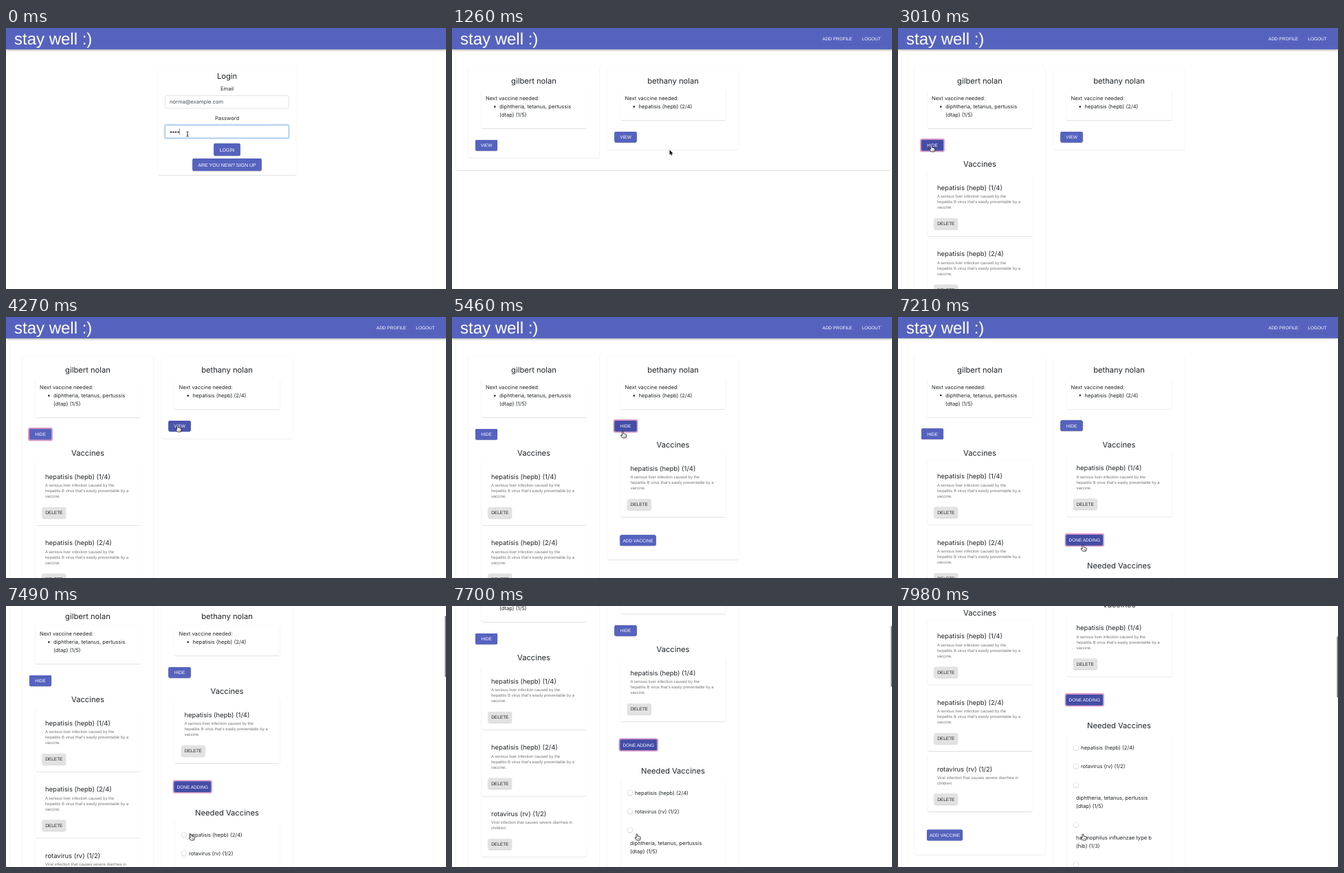
Write an HTML page with a canvas that moves like this. It is 640x380 px and loops after 8 s.

```html
<!DOCTYPE html>
<html lang="en">
<head>
<meta charset="utf-8">
<title>Vaccine tracker</title>
<style>
html, body { margin: 0; width: 640px; height: 380px; overflow: hidden; background: #fff; }
canvas { display: block; width: 640px; height: 380px; }
</style>
</head>
<body>
<canvas id="stage"></canvas>
<script>
const LOOP = 8000, STEP = 70;
const SANS = 'Inter, "Open Sans", sans-serif';
const ARIAL = '"Liberation Sans", Arial, sans-serif';
const BLUE = '#5663be', INK = '#212529';
const BODY = 7.6, HEAD = 11.2;

// Moments when the interface changes
const LOGIN = 700, HOME = 910, OPEN_LEFT = 3010, OPEN_RIGHT = 4830, ADDING = 6510;

// Shadow layers: offset, blur, spread, opacity
const FLAT = [[.5, 1.5, 0, .2], [.5, .5, 0, .12], [.7, .7, .4, .07]];
const RAISED = [[.5, 2, 0, .16], [1, 1, 0, .1]];
const FAINT = [[.5, 1.5, 0, .1]];
const BAR = [[1, 2, -.5, .16], [1.5, 2.5, 0, .12], [.5, 5, 0, .1]];

const canvas = document.getElementById('stage');
const ctx = canvas.getContext('2d');
const scale = window.devicePixelRatio || 1;
canvas.width = 640 * scale;
canvas.height = 380 * scale;

const clamp = v => Math.max(0, Math.min(1, v));
const smooth = v => v * v * (3 - 2 * v);
let now = 0;

const fade = (from, to = Infinity) =>
  clamp((now - from) / 210) * (1 - clamp((now - to) / 210));

function shape(x, y, w, h, r) {
  ctx.beginPath();
  ctx.roundRect(x, y, w, h, r);
}

function box(x, y, w, h, r, fill, layers) {
  ctx.fillStyle = fill;
  for (const [dy, blur, spread, alpha] of layers) {
    ctx.shadowColor = `rgba(0,0,0,${alpha})`;
    ctx.shadowOffsetY = dy * scale;
    ctx.shadowBlur = blur * scale;
    shape(x - spread, y - spread, w + 2 * spread, h + 2 * spread, r);
    ctx.fill();
  }
  ctx.shadowColor = 'transparent';
  shape(x, y, w, h, r);
  ctx.fill();
}

const card = (x, y, w, bottom) => box(x, y, w, bottom - y, 2, '#fff', FLAT);

// y is the middle of the capitals
function text(str, x, y, size, { color = INK, font = SANS, align = 'left' } = {}) {
  ctx.font = `${size}px ${font}`;
  ctx.textRendering = 'geometricPrecision';
  ctx.textAlign = align;
  ctx.fillStyle = color;
  ctx.fillText(str, x, y + size * .36);
}

const title = (str, x, y) => text(str, x, y, HEAD, { align: 'center' });

function dot(x, y, r, color) {
  ctx.beginPath();
  ctx.arc(x, y, r, 0, 7);
  ctx.fillStyle = color;
  ctx.fill();
}

function button(label, x, y, w,
  { h = 15.5, size = 6.5, hover = 0, ring = false, grey = false, shadow = RAISED } = {}) {
  if (ring) {
    shape(x - 1.9, y - 1.9, w + 3.8, h + 3.8, 3);
    ctx.fillStyle = '#d596c3';
    ctx.fill();
  }
  box(x, y, w, h, 2, grey ? '#e2e2e2' : BLUE, ring ? [] : shadow);
  if (hover > 0) {
    ctx.globalAlpha = hover;
    shape(x, y, w, h, 2);
    ctx.fillStyle = '#444da6';
    ctx.fill();
    ctx.globalAlpha = 1;
  }
  text(label, x + w / 2, y + h / 2, size,
    { color: grey ? INK : '#fff', font: ARIAL, align: 'center' });
}

function header(loggedIn) {
  box(0, -10, 640, 41, 0, BLUE, BAR);
  text('stay well :)', 12, 15.5, 24, { color: '#fff', font: ARIAL });
  if (loggedIn) {
    button('ADD PROFILE', 533.5, 8, 54, { shadow: FAINT });
    button('LOGOUT', 590.5, 8, 39, { shadow: FAINT });
  }
}

function field(y, focus) {
  if (focus) {
    shape(229.6, y - 1.4, 183.2, 22.3, 3);
    ctx.fillStyle = '#d3e2f6';
    ctx.fill();
  }
  shape(231.5, y + .5, 179.6, 18.5, 2);
  ctx.fillStyle = '#fff';
  ctx.fill();
  ctx.lineWidth = focus ? .8 : .6;
  ctx.strokeStyle = focus ? '#8fb6e6' : '#ced4da';
  ctx.stroke();
}

function loginPage() {
  const mid = { align: 'center' };
  header(false);
  card(221.5, 57, 200, 214);
  title('Login', 321.5, 70);
  text('Email', 321.5, 88, BODY, mid);
  field(98, false);
  text('norma@example.com', 238, 107.7, BODY, { color: '#495057' });
  text('Password', 321.5, 131, BODY, mid);
  field(141, now < LOGIN);
  for (let i = 0; i < 4; i++) dot(239.9 + i * 3.5, 151.6, 1.3, '#495057');
  if (now < 280) {
    ctx.fillStyle = '#333';
    ctx.fillRect(252.2, 146.5, .6, 9);
  }
  button('LOGIN', 302.5, 168, 38, { h: 18, size: 7, hover: fade(350), ring: now >= LOGIN });
  button('ARE YOU NEW? SIGN UP', 271.5, 190, 100, { h: 18, size: 7 });
}

const LIVER = ['A serious liver infection caused by the',
  "hepatitis B virus that's easily preventable by a", 'vaccine.'];
const ROTA = ['Viral infection that causes severe diarrhea in', 'children.'];

// Returns the bottom edge
function vaccine(name, lines, x, y) {
  const extra = lines.length * 8.25;
  const bottom = y + 67.5 + extra;
  card(x + 19, y, 152.5, bottom);
  text(name, x + 33, y + 22, 9.45);
  lines.forEach((line, i) =>
    text(line, x + 33, y + 34.5 + i * 8, 6, { color: 'rgba(0,0,0,.54)', font: ARIAL }));
  button('DELETE', x + 28.8, y + 42 + extra, 34, { grey: true });
  return bottom;
}

function choice(y, label) {
  const x = 259;
  dot(x, y + .3, 4.2, '#d2d2d2');
  dot(x, y, 3.5, '#fff');
  if (label.length === 1) text(label[0], 266, y, BODY);
  else label.forEach((line, i) => text(line, x, y + 19.2 + i * 12, BODY));
}

function neededList() {
  title('Needed Vaccines', 321.5, 362.5);
  card(246, 374, 151.5, 1560);
  choice(395, ['hepatisis (hepb) (2/4)']);
  choice(422, ['rotavirus (rv) (1/2)']);
  choice(449, ['diphtheria, tetanus, pertussis', '(dtap) (1/5)']);
  choice(507, ['haemophilus influenzae type b', '(hib) (1/3)']);
  choice(565, ['pneumococcal conjugate', '(pcv13) (1/4)']);
}

function profile(p) {
  const { x, next, shots, open } = p;
  const low = 122.5 + next.length * 12;
  card(x, 56, 190, p.bottom);
  title(p.name, x + 95, 77);
  card(x + 19, 90, 152.5, low - .5);
  text('Next vaccine needed:', x + 25, 102.3, BODY);
  dot(x + 38.3, 114.6, 1.3, INK);
  next.forEach((line, i) => text(line, x + 45, 114.3 + i * 12, BODY));
  button(open ? 'HIDE' : 'VIEW', x + 10, low + 16.5, 32, { hover: p.hover, ring: p.ring });
  if (!open) return;
  title('Vaccines', x + 95, low + 51.8);
  let y = low + 64;
  for (const [name, lines] of shots) y = vaccine(name, lines, x, y) + 4.3;
  button(p.adding ? 'DONE ADDING' : 'ADD VACCINE', x + 18, y + 22.4,
    p.adding ? 53.5 : 52, { hover: p.addHover, ring: p.adding });
}

function homePage() {
  const left = now >= OPEN_LEFT, right = now >= OPEN_RIGHT, adding = now >= ADDING;
  const leftEnd = left ? 550 : 188.5;
  const rightEnd = adding ? 1590 : right ? 353 : 176.5;
  card(6, 39, 631.5, Math.max(leftEnd, rightEnd) + 18.3);
  header(true);
  profile({
    x: 24, name: 'gilbert nolan', bottom: leftEnd, open: left,
    next: ['diphtheria, tetanus, pertussis', '(dtap) (1/5)'],
    shots: [['hepatisis (hepb) (1/4)', LIVER], ['hepatisis (hepb) (2/4)', LIVER],
      ['rotavirus (rv) (1/2)', ROTA]],
    hover: fade(2660, 3290), ring: left && !right
  });
  profile({
    x: 226.5, name: 'bethany nolan', bottom: rightEnd, open: right,
    next: ['hepatisis (hepb) (2/4)'],
    shots: [['hepatisis (hepb) (1/4)', LIVER]],
    hover: fade(4130, 5600), ring: right && !adding,
    adding, addHover: fade(6230)
  });
  if (adding) neededList();
}

// Time and page offset
const SCROLL = [[6860, 0], [7210, .5], [7280, 4], [7350, 17], [7420, 39],
  [7490, 62], [7630, 104], [7770, 142], [7980, 188.5]];

function scrollAt(t) {
  const i = SCROLL.findIndex(k => k[0] >= t);
  if (i < 0) return 188.5;
  if (i === 0) return 0;
  const [t0, a] = SCROLL[i - 1], [t1, b] = SCROLL[i];
  return a + (b - a) * (t - t0) / (t1 - t0);
}

function scrollbar(y) {
  if (y < 2) return;
  const ratio = 380 / 1622;
  shape(638.4, y * ratio, 1.6, 380 * ratio, .8);
  ctx.fillStyle = '#7d7d7d';
  ctx.fill();
}

// Start, end, target x, y, then how far the path bows sideways and down
const MOVES = [
  [0, 490, 322, 175, 0, 0],
  [770, 1260, 316.5, 177.5, 0, 0],
  [1890, 2730, 48.5, 171, 0, 22],
  [3010, 4300, 250, 158, 0, 14.7],
  [4830, 5250, 248.5, 167, 0, 0],
  [5460, 6370, 269, 332, 16, 0]
];
const POINTERS = [[0, 'beam'], [210, 'arrow'], [350, 'hand'], [HOME, 'arrow'], [2660, 'hand'],
  [3290, 'arrow'], [4130, 'hand'], [5600, 'arrow'], [6200, 'hand']];

function pointerAt(t) {
  let x = 264, y = 154.5;
  for (const [t0, t1, tx, ty, bx, by] of MOVES) {
    if (t < t0) break;
    const u = smooth(clamp((t - t0) / (t1 - t0)));
    const bow = 4 * u * (1 - u);
    x += (tx - x) * u + bx * bow;
    y += (ty - y) * u + by * bow;
  }
  return [x, y];
}

const ART = {
  arrow: new Path2D('M0 0V7L1.6 5.5 2.6 8 3.8 7.5 2.7 5.2H5Z'),
  hand: new Path2D('M-1 1Q-1 0 0 0T1 1V3.3Q2 2.7 2.6 3.6 3.5 3.1 4 4 5.2 3.7 5.2 5V6.6L4.3 9H-.4L-2.8 5.9Q-3 4.6-1.9 4.9L-1 5.8Z'),
  knuckles: new Path2D('M1.2 5.8V7.4M2.5 5.8V7.4M3.7 5.8V7.4'),
  beam: new Path2D('M-1.6-3.6Q0-3.6 0-2.6V2.6Q0 3.6-1.6 3.6M1.6-3.6Q0-3.6 0-2.6M0 2.6Q0 3.6 1.6 3.6M-.8.9H.8')
};

function pointer() {
  const kind = POINTERS.filter(p => p[0] <= now).pop()[1];
  ctx.save();
  ctx.translate(...pointerAt(now));
  ctx.lineJoin = 'round';
  ctx.strokeStyle = kind === 'arrow' ? '#fff' : '#111';
  ctx.fillStyle = kind === 'arrow' ? '#000' : '#fff';
  ctx.lineWidth = .8;
  if (kind === 'arrow') {
    ctx.stroke(ART.arrow);
    ctx.fill(ART.arrow);
  } else {
    if (kind === 'hand') ctx.fill(ART.hand);
    ctx.stroke(ART[kind]);
  }
  if (kind === 'hand') {
    ctx.lineWidth = .4;
    ctx.stroke(ART.knuckles);
  }
  ctx.restore();
}

function draw(time) {
  now = Math.floor((time % LOOP) / STEP) * STEP;
  ctx.setTransform(scale, 0, 0, scale, 0, 0);
  ctx.fillStyle = '#fff';
  ctx.fillRect(0, 0, 640, 380);
  const y = scrollAt(now);
  ctx.save();
  ctx.translate(0, -y);
  if (now < HOME) loginPage();
  else homePage();
  ctx.restore();
  scrollbar(y);
  pointer();
}

const start = performance.now();
function tick() {
  draw(performance.now() - start);
  requestAnimationFrame(tick);
}
tick();
</script>
</body>
</html>
```
